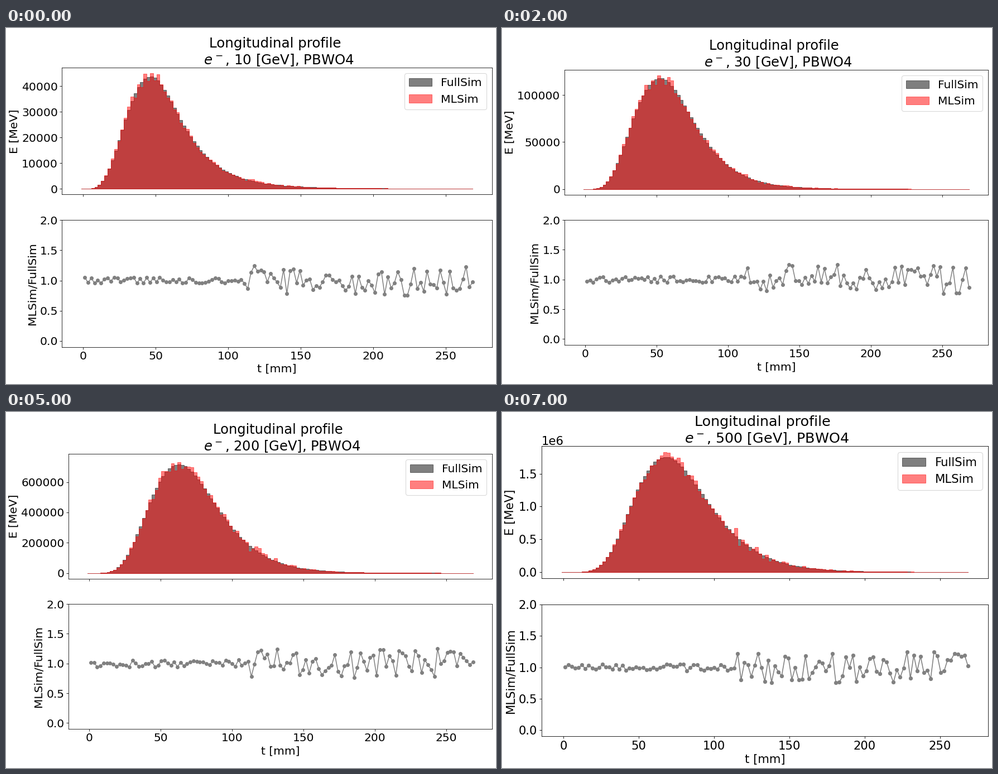
A matplotlib script that plays this animation: 878 by 638 pixels, repeating every 8 s.

```python
import matplotlib.pyplot as plt
import numpy as np
from matplotlib.animation import FuncAnimation

W, H, DPI = 878, 638, 64
RIGHT, MIDDLE = 871.2, 321.4
BASE = 772          # axes width at scale 1
FONT = 20.4         # label size in px at scale 1
BINS, STEP = 120, 2.2475
NARROW = 50

# energy [GeV], highest bin, widest label on the energy axis
SHOWERS = [
    (10, 44900, "00000"), (20, 84500, "00000"),
    (30, 120900, "000000"), (50, 197000, "000000"),
    (100, 386300, "000000"), (200, 749800, "000000"),
    (300, 1.0824e6, "0.00"), (500, 1.827e6, "0.0"),
]

index = np.arange(BINS)
edges = STEP * (np.arange(BINS + 1) - 0.5)


def profile(energy):
    """Gamma-like shower: deeper and steeper as the energy grows."""
    x = np.log(energy / 10)
    early = np.exp(-2 * x)
    peak = energy * (3400 + 970 * np.exp(-0.55 * x))
    depth = 47 + 5.3 * x
    rise = 5 + 0.165 * x ** 2
    fall = 6.8 + 0.28 * x + 1.3 * early
    soft = 0.18 + 0.32 * early
    r = np.maximum(index * STEP, 0.1) / depth
    power = np.where(r < 1, rise, fall / (1 + soft * np.maximum(r - 1, 0)))
    return peak * np.exp(power * (np.log(r) + 1 - r))


def ratio(energy):
    """Noise around one, wider in the tail."""
    rng = np.random.default_rng(energy)
    spread = np.where(index < NARROW, 0.06, 0.25)
    return 1 + spread * rng.uniform(-1, 1, BINS)


def left_edge(label):
    """Left side of the axes, leaving room for the tick labels."""
    dots = label.count(".")
    em = 0.636 * (len(label) - dots) + 0.318 * dots
    room = (FONT * em + 38) / BASE
    return (room * RIGHT - 2.5) / (1 + room)


def set_style(u):
    """Scale all text and line sizes by u."""
    style = {
        "font.family": "DejaVu Sans", "font.size": 20 * u,
        "axes.linewidth": 0.8 * u, "axes.labelpad": 4 * u,
        "axes.titlepad": 6 * u, "lines.linewidth": 1.5 * u,
        "lines.markersize": 6 * u, "patch.linewidth": u,
    }
    for axis in ("xtick", "ytick"):
        style[axis + ".major.size"] = 3.5 * u
        style[axis + ".major.pad"] = 3.5 * u
        style[axis + ".major.width"] = 0.8 * u
    plt.rcParams.update(style)


def add_axes(left, top, height, **kwargs):
    box = [left / W, 1 - (top + height) / H, (RIGHT - left) / W, height / H]
    return fig.add_axes(box, **kwargs)


def draw(i):
    energy, top, label = SHOWERS[i]
    left = left_edge(label)
    k = (RIGHT - left) / BASE
    set_style(FONT / 20 * k * 72 / DPI)
    fig.clear()
    height, gap = 227.6 * k, 23 * k
    upper = add_axes(left, MIDDLE - gap - height, height)
    lower = add_axes(left, MIDDLE + gap, height, sharex=upper)

    full = profile(energy)
    rel = ratio(energy)
    for values, color, name in ((full, "black", "FullSim"),
                                (full * rel, "red", "MLSim")):
        values = np.minimum(values, top)
        upper.fill_between(edges, np.append(values[0], values), step="pre",
                           color=color, alpha=0.5, label=name)
    margin = 0.05 * (edges[-1] - edges[0])
    upper.set_xlim(edges[0] - margin, edges[-1] + margin)
    upper.set_ylim(-0.05 * top, 1.05 * top)
    upper.tick_params(labelbottom=False)
    upper.set_ylabel("E [MeV]")
    upper.set_title(f"Longitudinal profile \n $e^-$, {energy} [GeV], PBWO4")
    upper.legend(loc="upper right")

    lower.plot(edges[1:], rel, "o-", color="gray")
    lower.set_ylim(-0.1, 2.0)
    lower.set_ylabel("MLSim/FullSim")
    lower.set_xlabel("t [mm]")
    return []


fig = plt.figure(figsize=(W / DPI, H / DPI), dpi=DPI, facecolor="white")
anim = FuncAnimation(fig, draw, frames=len(SHOWERS), interval=1000,
                     repeat=True, repeat_delay=0)
plt.show()
```
